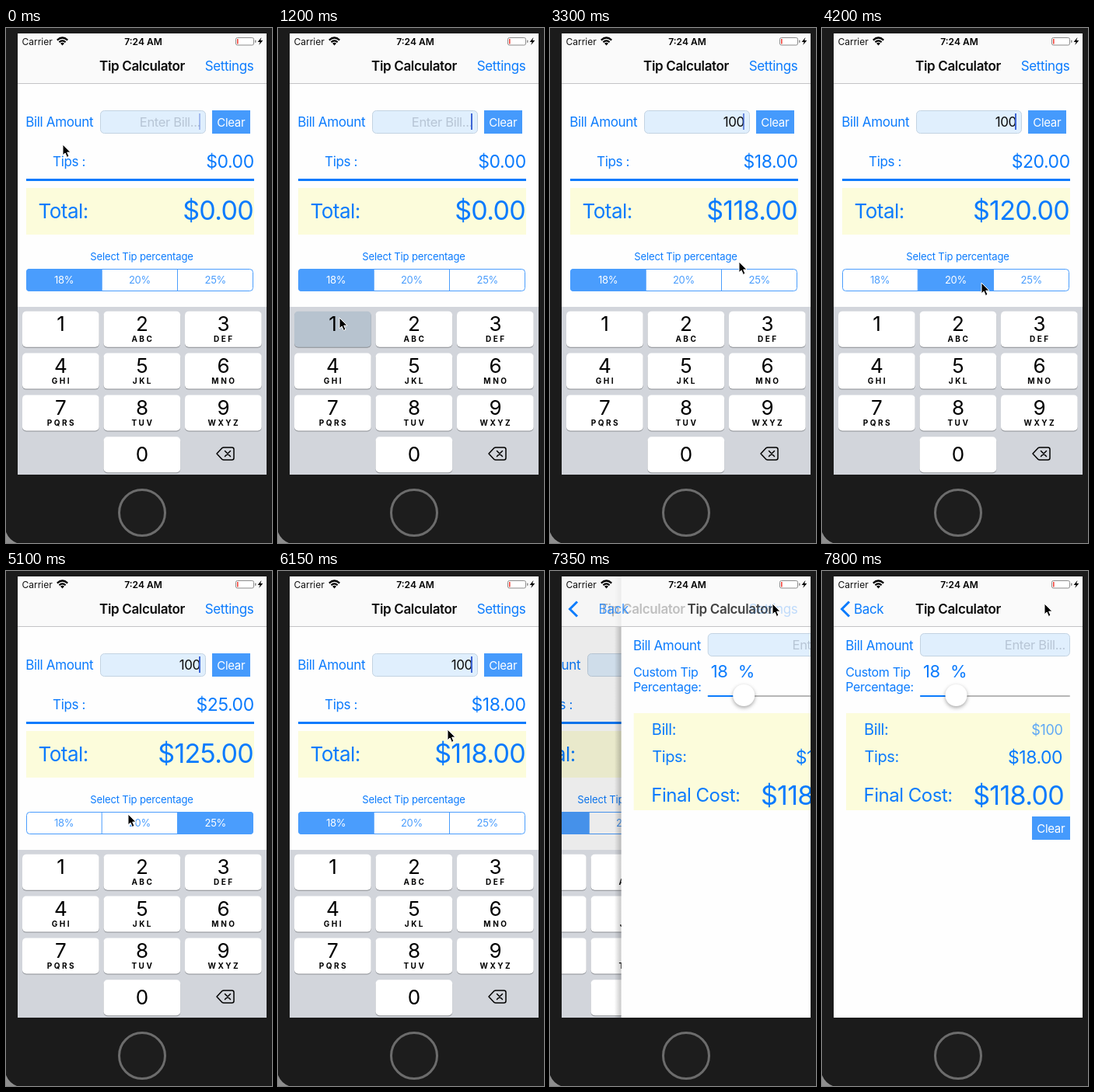
An HTML page for the animation above (8000 ms loop, 342x663 px).

```html
<!DOCTYPE html>
<html lang="en">
<head>
<meta charset="utf-8">
<title>Tip Calculator</title>
<style>
  html, body { margin: 0; width: 100%; height: 100%; overflow: hidden; background: #1b1b1b; }
  svg { display: block; }
  text { font-family: Inter, Roboto, sans-serif; letter-spacing: -.02em; fill: #0b7bfd; }
</style>
</head>
<body>
<svg id="stage" width="342" height="663" viewBox="0 0 342 663"></svg>
<script>
const BLUE = '#0b7bfd', SOFT = '#4a9dfd', CREAM = '#fcfcdb';
const STEP = 150, LOOP = 8000, LAST = 7800;

const text = (x, y, size, str, attrs = '') =>
  `<text x="${x}" y="${y}" font-size="${size}" ${attrs}>${str}</text>`;
const rect = (x, y, w, h, fill, attrs = '') =>
  `<rect x="${x}" y="${y}" width="${w}" height="${h}" fill="${fill}" ${attrs}/>`;
const END = 'text-anchor="end"', MID = 'text-anchor="middle"';
const fill = (color, more = '') => `${more} style="fill:${color}"`;

const field = (x, y, w) => rect(x + .5, y + .5, w - 1, 29, '#e0effd', 'rx="5" stroke="#c3d3e2"');
const clearButton = (x, y) =>
  rect(x, y, 49, 30, '#459afc') + text(x + 24.3, y + 20.5, 15, 'Clear', fill('#fff', MID));

// Number pad
const letters = ['', 'ABC', 'DEF', 'GHI', 'JKL', 'MNO', 'PQRS', 'TUV', 'WXYZ'];
function key(digit, col, row, sub) {
  const x = 21 + col * 104.5, y = 364.8 + row * 53.8, mid = x + 49.2;
  return rect(x, y + 1, 98.7, 46, '#8b8e93', 'rx="5"') +
    rect(x, y, 98.7, 46, '#fff', `rx="5" id="key${digit}"`) +
    text(mid, y + (row === 3 ? 31.5 : 25.2), 26, digit, fill('#000', MID)) +
    (sub ? text(mid + 1.2, y + 39.4, 10, sub,
      MID + ' font-weight="700" style="fill:#000;letter-spacing:2.5px"') : '');
}
const keypad = rect(15, 359, 320, 216, '#d2d5db') +
  letters.map((sub, i) => key(i + 1, i % 3, Math.floor(i / 3), sub)).join('') +
  key(0, 1, 3) +
  `<g fill="none" stroke="#000" stroke-width="1.5" stroke-linecap="round" stroke-linejoin="round">
    <path d="M271 548L278 540.6Q278.7 540 280 540H290.5Q293 540 293 542.5V553.5Q293 556 290.5 556H280Q278.7 556 278 555.4Z"/>
    <path d="M281.5 544.5l7 7m0-7l-7 7"/></g>`;

// Tip percentage control
const rates = [18, 20, 25], segWidth = 97.33;
const segments = `<g clip-path="url(#segClip)">` +
  rates.map((_, i) => rect(26 + i * segWidth, 310, segWidth, 29, '#fff', `id="seg${i}"`)).join('') + '</g>' +
  rect(26.5, 310.5, 291, 28, 'none', `rx="4" stroke="${SOFT}"`) +
  rect(122.7, 310, 1, 29, SOFT) + rect(220, 310, 1, 29, SOFT) +
  rates.map((r, i) => text(26 + (i + .5) * segWidth, 329.3, 13, r + '%',
    `${MID} id="rate${i}" letter-spacing="0"`)).join('');

const mainPage = rect(15, 7, 320, 568, '#fefefe') +
  text(25.2, 127, 17, 'Bill Amount') + field(121, 106, 136) +
  text(250, 126.5, 16.5, '', END + ' id="bill"') +
  rect(248, 110, 2, 21, '#3f66d6', 'id="caret"') + clearButton(265, 106) +
  text(60, 178, 17, 'Tips :') + text(318.7, 180, 23, '', END + ' id="tips"') +
  rect(26, 194, 293, 3, BLUE) + rect(26, 206, 293, 60, CREAM) +
  text(41.5, 245, 26, 'Total:') + text(318, 247.3, 34, '', END + ' id="total"') +
  text(174.5, 298.5, 13, 'Select Tip percentage', MID + ' style="letter-spacing:-.01em"') +
  segments + rect(15, 7, 320, 568, '#000', 'id="dim" opacity="0"') + keypad;

const detailPage = rect(6, 7, 9, 568, 'url(#edge)') + rect(15, 7, 320, 568, '#fefefe') +
  text(30.2, 101.5, 17, 'Bill Amount') + field(126, 80, 193) +
  text(313, 100.5, 16.5, 'Enter Bill...', fill('#b7c5d5', END)) +
  text(30.2, 136, 16, 'Custom Tip') + text(30.2, 154.8, 16, 'Percentage:') +
  text(130, 136.5, 22, '18') + text(165, 136.5, 22, '%') +
  rect(126, 160, 193, 2, '#b6b6b6', 'rx="1"') + rect(126, 160, 46, 2, BLUE, 'rx="1"') +
  `<circle cx="172.5" cy="160" r="14" fill="#fff" style="filter:drop-shadow(0 2px 2.5px rgba(0,0,0,.35))"/>` +
  rect(31, 183, 288, 125, CREAM) +
  text(54, 210.5, 20, 'Bill:') + text(309.5, 210.5, 18, '$100', fill('#5fa8f5', END)) +
  text(54.5, 245.5, 20, 'Tips:') + text(309.2, 248.2, 23, '$18.00', END) +
  text(53.5, 297, 24, 'Final Cost:') + text(311, 300.5, 34, '$118.00', END) +
  clearButton(270, 316);

const navBar = rect(15, 7, 320, 64, '#f9f9f9', 'opacity=".8"') + rect(15, 71, 320, 1, '#c4c4c6') +
  text(175, 55, 17, 'Tip Calculator', fill('#0a0a0a', MID + ' font-weight="600" id="oldTitle"')) +
  text(175, 55, 17, 'Tip Calculator', fill('#0a0a0a', MID + ' font-weight="600" id="newTitle"')) +
  text(318.5, 55, 17, 'Settings', END + ' id="settings"') +
  `<path id="chevron" d="M35 39.5L25.5 49L35 58.5" fill="none" stroke="${BLUE}" stroke-width="3"/>` +
  text(41, 55, 17, 'Back', 'id="back"');

const statusBar = text(20.5, 21.5, 12, 'Carrier', 'style="fill:#111;letter-spacing:0"') +
  text(176.5, 21.5, 12, '7:24 AM', MID + ' font-weight="600" style="fill:#000;letter-spacing:0"') +
  `<g fill="none" stroke="#000" stroke-width="2.2">
    <path d="M65.8 15.6Q72.5 9.4 79.2 15.6M68.4 18.2Q72.5 14.4 76.6 18.2"/></g>
  <path d="M70 19.8Q72.5 17.8 75 19.8L72.5 22.4Z"/>` +
  rect(295.5, 12.5, 23, 9.5, '#fff', 'rx="2" stroke="#8c8c8c"') +
  rect(297, 14, 1.6, 6.5, '#f0453c') + rect(320, 15.5, 1.5, 3.5, '#8c8c8c', 'rx=".7"') +
  '<path d="M328.5 12L323.6 18H326.6L325.2 22L330.3 16H327.2Z"/>';

document.getElementById('stage').innerHTML = `
  <defs>
    <clipPath id="screen">${rect(15, 7, 320, 568, '#fff')}</clipPath>
    <clipPath id="segClip">${rect(26, 310, 292, 29, '#fff', 'rx="4"')}</clipPath>
    <linearGradient id="edge">
      <stop offset="0" stop-opacity="0"/><stop offset="1" stop-opacity=".22"/>
    </linearGradient>
  </defs>
  ${rect(0, 0, 342, 663, '#1b1b1b')}
  <path d="M0 649Q4 659 14 663H0Z" fill="#8e8e8e"/>
  <circle cx="175" cy="624" r="29.5" fill="#1d1d1d" stroke="#6c6c6c" stroke-width="3"/>
  <g clip-path="url(#screen)">
    <g id="main">${mainPage}</g><g id="detail">${detailPage}</g>${navBar}${statusBar}
  </g>
  <path id="pointer" d="M0 0V13.8L3.1 11L5.4 16.4L8 15.3L5.7 10.1H10Z" stroke="#fff" stroke-width="1"/>`;

const $ = {};
document.querySelectorAll('[id]').forEach(el => $[el.id] = el);

// time, x, y
const path = [
  [300, 73, 150], [450, 74, 180], [600, 76, 250], [750, 78, 320], [1050, 79, 371], [1200, 79, 373],
  [1350, 83, 376], [1500, 95, 408], [1650, 124, 470], [1800, 152, 520], [1950, 168, 540],
  [2100, 172, 545], [2850, 172, 545], [3000, 200, 440], [3150, 232, 340], [3300, 243, 301],
  [3450, 228, 306], [3750, 176, 325], [4050, 172, 327], [4200, 205, 328], [4500, 263, 329],
  [4950, 262, 328], [5100, 157, 313], [5250, 112, 322], [5400, 91, 329], [5550, 88, 330],
  [6000, 88, 330], [6150, 218, 204], [6300, 258, 120], [6450, 278, 66], [6750, 286, 42]
];
function pointerAt(t) {
  const i = path.findIndex(k => k[0] >= t);
  if (i < 0) return path[path.length - 1].slice(1);
  if (i === 0) return path[0].slice(1);
  const [a, b] = [path[i - 1], path[i]], u = (t - a[0]) / (b[0] - a[0]);
  return [1, 2].map(n => a[n] + (b[n] - a[n]) * u);
}

const between = (t, a, b) => t >= a && t < b;
const latest = (t, steps) => steps.filter(s => s[0] <= t).pop()[1];
const money = v => '$' + v.toFixed(2);
const shift = (el, x, y = 0) => el.setAttribute('transform', `translate(${x} ${y})`);
const clamp = v => Math.min(1, Math.max(0, v));

// Each keystroke restarts the one-second blink
function caretAlpha(t) {
  const start = latest(t, [[0, -950], [1350, 1350], [2400, 2400], [2700, 2700]]);
  const phase = (t - start) % 1000;
  return clamp(Math.max((700 - phase) / 140, (phase - 920) / 80));
}

function pushProgress(t) {
  if (t >= LAST) return 1;
  const s = Math.max(0, t - 7150) * .01375;
  return 1 - (1 + s) * Math.exp(-s);
}

function render(t) {
  const bill = latest(t, [[0, 0], [1350, 1], [2550, 10], [2700, 100]]);
  const chosen = latest(t, [[0, 0], [4050, 1], [4650, 2], [5700, 0]]);
  const touched = between(t, 3900, 4050) ? 1 : between(t, 4500, 4650) ? 2 : between(t, 5550, 5700) ? 0 : -1;
  const tip = bill * rates[chosen] / 100;

  $.bill.textContent = bill || 'Enter Bill...';
  $.bill.style.fill = bill ? '#0a0a0a' : '#b7c5d5';
  $.bill.setAttribute('font-size', bill ? 17 : 16.5);
  $.tips.textContent = money(tip);
  $.total.textContent = money(bill + tip);
  $.caret.setAttribute('opacity', caretAlpha(t));
  rates.forEach((_, i) => {
    $['seg' + i].setAttribute('fill', i === chosen ? SOFT : i === touched ? '#dbebfe' : '#fff');
    $['rate' + i].style.fill = i === chosen ? '#fff' : SOFT;
  });
  $.key1.setAttribute('fill', between(t, 1200, 1350) ? '#b7c3cf' : '#fff');
  $.key0.setAttribute('fill', between(t, 2400, 2700) ? '#b7c3cf' : '#fff');

  const p = pushProgress(t), rest = 1 - p;
  shift($.main, -96 * p);
  shift($.detail, 320 * rest);
  $.detail.style.display = p ? '' : 'none';
  $.dim.setAttribute('opacity', .1 * p);
  shift($.oldTitle, -74 * p);
  $.oldTitle.setAttribute('opacity', rest);
  shift($.newTitle, 236 * rest);
  $.newTitle.setAttribute('opacity', p);
  shift($.back, 90 * rest);
  $.back.setAttribute('opacity', p);
  $.chevron.setAttribute('opacity', clamp(p * 1.3));
  $.settings.setAttribute('opacity', t >= 7050 ? Math.min(.3, rest) : 1);
  shift($.pointer, ...pointerAt(t));
}

const origin = performance.now();
function frame() {
  const t = (performance.now() - origin) % LOOP;
  render(Math.min(Math.floor(t / STEP) * STEP, LAST));
  requestAnimationFrame(frame);
}
frame();
</script>
</body>
</html>
```
